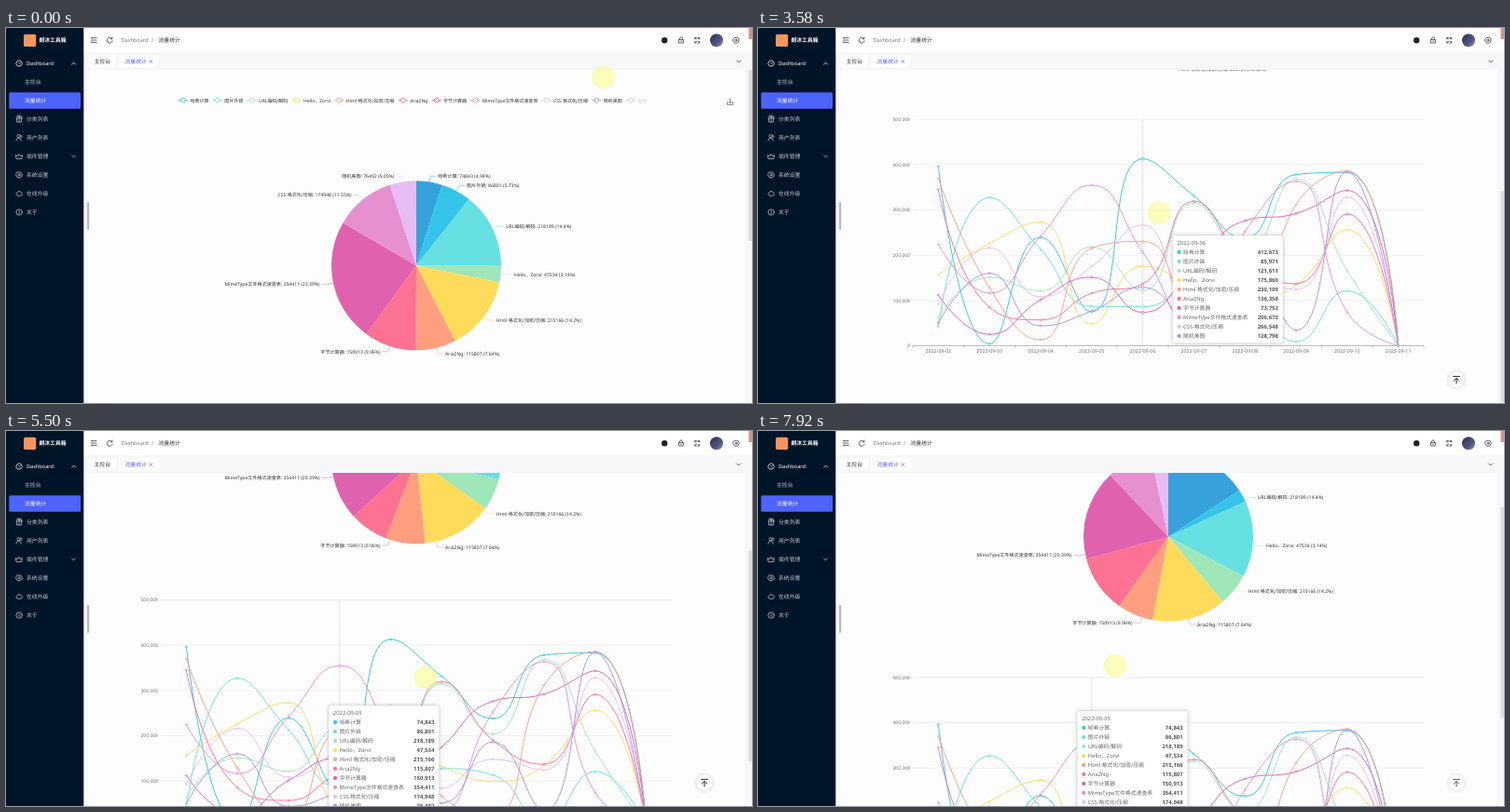
These frames come from a looping animation (800 px wide and 403 px high, 8 s). An HTML page:

```html
<!DOCTYPE html>
<html lang="zh-CN">
<head>
<meta charset="utf-8">
<title>流量统计</title>
<style>
html, body { margin: 0; width: 100%; height: 100%; overflow: hidden; background: #f5f7f9; }
svg { display: block; width: 100vw; height: 100vh; }
text { font-family: "Noto Sans", "Noto Sans CJK SC", sans-serif; text-rendering: geometricPrecision; white-space: pre; }
.icon { fill: none; stroke-width: .75; stroke-linecap: round; stroke-linejoin: round; }
.box { filter: drop-shadow(.4px .8px 2px rgba(0, 0, 0, .22)); }
</style>
</head>
<body>
<svg id="stage" viewBox="0 0 800 403">
  <defs>
    <clipPath id="view"><rect x="84" y="45" width="716" height="358"/></clipPath>
    <linearGradient id="face" x1="0" y1="0" x2="1" y2="1">
      <stop offset="0" stop-color="#2b2f4a"/><stop offset=".6" stop-color="#4d5480"/><stop offset="1" stop-color="#8c90b4"/>
    </linearGradient>
  </defs>
  <rect width="800" height="403" fill="#f5f7f9"/>
  <rect x="87.5" y="45" width="705" height="358" fill="#fefdfe"/>
  <g clip-path="url(#view)">
    <g id="page">
      <g id="legend"></g>
      <path class="icon" stroke="#666" d="M773.5 79.5v3h6v-3M776.5 76v4.6M774.8 79l1.7 1.7 1.7-1.7"/>
      <g id="pie"></g>
      <g id="chart"></g>
      <g id="tip"></g>
    </g>
    <rect id="thumb" x="796.3" width="3.7" height="227" fill="#dddddf"/>
  </g>
  <g id="top">
    <circle class="box" cx="749" cy="378" r="8.4" fill="#fff"/>
    <path class="icon" style="stroke-width:1" stroke="#222" d="M745.6 374.4h6.8M749 382v-5.4M746.2 379.2l2.8-2.8 2.8 2.8"/>
  </g>
  <g id="frame">
    <rect x="83" width="717" height="27" fill="#fff"/>
    <rect x="83" y="26.7" width="717" height=".4" fill="#e8eaee"/>
    <rect x="83" y="27.1" width="717" height="17.9" fill="#f5f7f9"/>
    <rect x="88" y="29.3" width="30" height="13.2" rx="1" fill="#fff"/>
    <rect x="121" y="29.3" width="43" height="13.2" rx="1" fill="#fff"/>
    <rect x="796.5" width="3.5" height="12" fill="#cf9688"/>
    <rect x="87" y="187" width="2.2" height="30" rx="1" fill="#b9b9bc"/>
    <rect width="83.3" height="403" fill="#001428"/>
    <rect x="3.3" y="69.2" width="76.7" height="17.5" rx="1.3" fill="#4d63fa"/>
    <rect x="19" y="6.8" width="13.2" height="13.2" rx="1.5" fill="#f4955f"/>
    <g class="icon" stroke="#333">
      <path d="M91.2 10.6h5.8M93.6 13h3.4M91.2 15.4h5.8M92.6 12l-1.2 1 1.2 1"/>
      <path d="M113.6 11.4a3 3 0 1 0 .6 2.6M113.9 10v1.8h-1.8"/>
      <path d="M721.6 12.6h4.8v3.4h-4.8zM722.5 12.6v-1.2a1.5 1.5 0 0 1 3 0v1.2M724 14v.8"/>
      <path d="M738.8 12v-1.6h1.6M743.6 12v-1.6h-1.6M738.8 14.4v1.6h1.6M743.6 14.4v1.6h-1.6M739 10.6l1.4 1.4M743.4 10.6l-1.4 1.4M739 15.8l1.4-1.4M743.4 15.8l-1.4-1.4"/>
      <path d="M781.3 10.3h3.4l1.7 2.9-1.7 2.9h-3.4l-1.7-2.9z"/><circle cx="783" cy="13.2" r="1.1"/>
      <path d="M783.6 35l2 2 2-2"/>
    </g>
    <path class="icon" stroke="#5565f5" d="M154 34.6l2.8 2.8M156.8 34.6l-2.8 2.8"/>
    <circle cx="706.2" cy="13.2" r="3.2" fill="#222"/>
    <circle cx="762" cy="13.2" r="7" fill="url(#face)"/>
    <g class="icon" stroke="#c3c8ce">
      <path stroke="#fff" d="M12 40.6a3.2 3.2 0 1 1 4.2 0zM14 38.6l1.4-1.6M70.6 39l1.9-1.9 1.9 1.9"/>
      <path d="M11 97h6.2M11.6 97v4h5v-4M11.2 95.2h5.8v1.8M14.1 95.2v5.8M14 95l-1.5-1.5M14.2 95l1.5-1.5"/>
      <circle cx="13.6" cy="116.2" r="1.7"/><path d="M11 121c.2-4 5-4 5.2 0M16 115l1.2 1.6-1.2 1.4"/>
      <path d="M11.4 140.6h5.4l.7-4-2 1.2-1.4-2.4-1.4 2.4-2-1.2zM70.6 137l1.9 1.9 1.9-1.9"/>
      <path d="M12.4 155h3.4l1.7 2.9-1.7 2.9h-3.4l-1.7-2.9z"/><circle cx="14.1" cy="157.9" r="1.1"/>
      <path d="M12.4 180.2a1.7 1.7 0 0 1-.2-3.3a2.2 2.2 0 0 1 4.1 0a1.7 1.7 0 0 1-.2 3.3z"/>
      <circle cx="14.1" cy="198" r="3.2"/><path d="M14.1 197.6v2M14.1 196.2v.1"/>
    </g>
  </g>
  <circle id="cursor" r="12.5" fill="#fafa50" fill-opacity=".38"/>
</svg>
<script>
const $ = id => document.getElementById(id);
const NS = 'http://www.w3.org/2000/svg';

function set(el, attrs) {
  for (const k in attrs) el.setAttribute(k, attrs[k]);
}
function add(parent, tag, attrs = {}) {
  const el = document.createElementNS(NS, tag);
  set(el, attrs);
  return parent.appendChild(el);
}
// y is the middle of the line of text
function label(parent, x, y, str, size, fill, more = {}) {
  const el = add(parent, 'text', { x, y: y + size * .36, 'font-size': size, fill, ...more });
  el.textContent = str;
  return el;
}
const clamp = (v, a, b) => Math.max(Math.min(a, b), Math.min(Math.max(a, b), v));
const lerp = (a, b, u) => a.map((v, i) => v + (b[i] - v) * u);

// daily visits in thousands; the last day is empty
const VISITS = {
  '哈希计算': [396, 4, 239, 74.843, 412.673, 331, 238, 378.058, 383, 0],
  '图片外链': [42, 327, 213, 86.801, 85.971, 127, 113, 8.956, 121, 0],
  'URL编码/解码': [63, 151, 121, 218.189, 121.611, 315, 203, 368.142, 166, 0],
  'Hello，Zorvi': [156, 226, 273, 47.534, 175.86, 132, 99, 134.613, 256, 0],
  'Html 格式化/加密/压缩': [370, 128, 13, 215.166, 230.109, 66, 28, 311.296, 386, 0],
  'Aria2Ng': [345, 85, 57, 115.807, 136.358, 319, 190, 136.785, 291, 0],
  '字节计算器': [112, 25, 101, 150.913, 73.753, 175, 276, 291.889, 343, 0],
  'MimeType文件格式速查表': [224, 116, 242, 354.411, 206.67, 36, 252, 363.29, 74, 0],
  'CSS 格式化/压缩': [92, 216, 108, 174.948, 266.548, 84, 148, 124.267, 328, 0],
  '随机美图': [50, 160, 44, 76.492, 128.798, 51, 186, 34.29, 384, 0]
};
const NAMES = Object.keys(VISITS);
const ROWS = Object.values(VISITS);
const PALETTE = ['#37a2da', '#32c5e9', '#67e0e3', '#9fe6b8', '#ffdb5c', '#ff9f7f',
  '#fb7293', '#e062ae', '#e690d1', '#e7bcf3', '#9d96f5'];
const FIRST_DAY = 3;
const date = day => '2022-09-' + String(day + 2).padStart(2, '0');
const count = (row, day) => Math.round(row[day] * 1000);

// each series' part of a day; a fraction lies between two days
function shares(day) {
  const d = Math.floor(day), u = day - d;
  if (u) return lerp(shares(d), shares(d + 1), u);
  const sum = ROWS.reduce((s, row) => s + row[d], 0);
  return ROWS.map(row => row[d] / sum);
}

// ---- motion: [time, value...] ----
const SCROLL = [[2417, 0], [2667, 117.5], [3300, 308.3], [4167, 308.3], [4250, 286.5],
  [5400, 225], [5800, 225], [6333, 141.6]];
const MOUSE = [[250, 641, 53], [900, 395, 185], [1083, 385, 210], [1333, 401, 250], [1550, 455, 310],
  [1717, 490, 230], [1930, 436, 216], [3300, 436, 216], [4000, 421.5, 174], [4250, 421, 271],
  [5250, 336.5, 278], [5500, 450, 265], [6167, 575.5, 292], [6500, 580, 293],
  [7150, 334, 292], [7667, 333, 292], [7917, 383, 252]];
const PIE_DAY = [[3100, 3], [4437, 4], [4900, 4], [5500, 3.44], [6300, 3.47], [9000, 7]];

function segment(keys, t) {
  const n = keys.findIndex(k => k[0] > t), last = keys[keys.length - 1];
  if (n === 0) return [keys[0], keys[0], 0];
  if (n < 0) return [last, last, 0];
  const a = keys[n - 1], b = keys[n];
  return [a, b, (t - a[0]) / (b[0] - a[0])];
}
function at(keys, t) {
  const [a, b, u] = segment(keys, t);
  return lerp(a.slice(1), b.slice(1), u);
}

// the page answers the mouse a little late
const LAG = 250, FADE = 150, SAMPLES = 8;
function felt(t) {
  const [x, y] = at(MOUSE, t - LAG);
  return [x, y + at(SCROLL, t - LAG)[0]];
}
// mean over the fade time, so that jumps become linear fades
function soften(t, value) {
  let sum = 0;
  for (let i = 0; i < SAMPLES; i++) sum += value(felt(t - FADE * i / (SAMPLES - 1)));
  return sum / SAMPLES;
}

// ---- shell ----
const frame = $('frame');
label(frame, 35.5, 13.2, '朗沐工具箱', 5.8, '#fff', { 'font-weight': 700 });
['Dashboard', '主控台', '流量统计', '分类列表', '用户列表', '插件管理', '系统设置', '在线升级', '关于'].forEach((s, i) => {
  const lit = i === 0 || i === 2, nested = i === 1 || i === 2;
  label(frame, nested ? 20 : 22, 38 + i * 20, s, i ? 5.83 : 5.6, lit ? '#fff' : '#c3c8ce', { 'font-weight': lit ? 500 : 400 });
});
label(frame, 123.5, 13.2, 'Dashboard', 5.6, '#767c82');
label(frame, 156.3, 13.2, '/', 5.6, '#767c82');
label(frame, 163.5, 13.2, '流量统计', 5.83, '#333639');
label(frame, 94.5, 36, '主控台', 5.83, '#333639');
label(frame, 127.5, 36, '流量统计', 5.83, '#5565f5');

// ---- legend ----
let legendX = 185;
[...NAMES, '其他'].forEach((s, i) => {
  const on = i < NAMES.length, stroke = on ? PALETTE[i + 1] : '#ccc', g = $('legend'), y = 77.7;
  add(g, 'path', { d: `M${legendX} ${y}h10.4`, stroke, 'stroke-width': .9 });
  add(g, 'circle', { cx: legendX + 5.2, cy: y, r: 2.4, fill: '#fff', stroke, 'stroke-width': .9 });
  const text = label(g, legendX + 12.5, y, s, 5.03, on ? '#333' : '#ccc');
  legendX += 16.7 + text.getComputedTextLength();
});

// ---- pie ----
const CX = 440, CY = 255.3, R = 91, ARM = 6.25;
const polar = (f, r) => [CX + r * Math.sin(f * 2 * Math.PI), CY - r * Math.cos(f * 2 * Math.PI)];
const slices = NAMES.map((_, i) => add($('pie'), 'path', { fill: PALETTE[i] }));
const tags = NAMES.map((_, i) => {
  const g = add($('pie'), 'g');
  return { g, line: add(g, 'path', { fill: 'none', stroke: PALETTE[i], 'stroke-width': .5 }),
    text: label(g, 0, 0, '', 5.08, '#333') };
});

// index of the slice under a point, or -1
function sliceAt([x, y]) {
  if (Math.hypot(x - CX, y - CY) > R) return -1;
  let f = (Math.atan2(x - CX, CY - y) / (2 * Math.PI) + 1) % 1;
  return shares(FIRST_DAY).findIndex(s => (f -= s) < 0);
}

function drawPie(t, day) {
  const [a, b, u] = segment(PIE_DAY, t);
  const now = lerp(shares(a[1]), shares(b[1]), u), goal = shares(day);
  let from = 0, sum = 0;
  NAMES.forEach((name, i) => {
    const to = from + now[i], r = R + 2 * soften(t, p => +(sliceAt(p) === i));
    const opacity = soften(t, p => [-1, i].includes(sliceAt(p)) ? 1 : .11);
    set(slices[i], { d: `M${CX} ${CY}L${polar(from, r)}A${r} ${r} 0 0 1 ${polar(to, r)}Z`, opacity });
    from = to;

    // labels jump to the new day at once
    const mid = sum + goal[i] / 2, side = mid < .5 ? 1 : -1, tag = tags[i];
    const elbow = polar(mid, R + ARM), end = elbow[0] + side * ARM;
    sum += goal[i];
    set(tag.g, { opacity });
    set(tag.line, { d: `M${polar(mid, R)}L${elbow}H${end}` });
    set(tag.text, { x: end + side * 2, y: elbow[1] + 1.8, 'text-anchor': side > 0 ? 'start' : 'end' });
    tag.text.textContent = `${name}: ${count(ROWS[i], day)} (${+(goal[i] * 100).toFixed(2)}%)`;
  });
}

// ---- line chart ----
const LEFT = 166, RIGHT = 714, BASE = 649.7, STEP = (RIGHT - LEFT) / 10;
const px = day => LEFT + STEP * (day + .5);
const py = v => BASE - v * .4865;

// cubic curve whose handles stay within the box of each segment
function curve(pts) {
  let d = 'M' + pts[0], out = pts[0];
  for (let i = 1; i < pts.length; i++) {
    const [a, p, n] = [pts[i - 1], pts[i], pts[i + 1]];
    let inn = p, next = p;
    if (n) {
      const before = Math.hypot(p[0] - a[0], p[1] - a[1]), after = Math.hypot(n[0] - p[0], n[1] - p[1]);
      const ratio = after / (before + after);
      next = p.map((v, k) => clamp(v + (n[k] - a[k]) * .5 * ratio, v, n[k]));
      inn = p.map((v, k) => clamp(v - (next[k] - v) * before / after, a[k], v));
      next = p.map((v, k) => v + (v - inn[k]) * after / before);
    }
    d += `C${out} ${inn} ${p}`;
    out = next;
  }
  return d;
}

const chart = $('chart');
for (let v = 0; v <= 500; v += 100) {
  add(chart, 'path', { d: `M${LEFT} ${py(v)}H${RIGHT}`, stroke: v ? '#e0e3ea' : '#6e7079', 'stroke-width': .5 });
  label(chart, 163, py(v), v ? v + ',000' : '0', 5, '#6e7079', { 'text-anchor': 'end' });
}
for (let i = 0; i <= 10; i++) {
  add(chart, 'path', { d: `M${LEFT + i * STEP} ${BASE}v2.1`, stroke: '#6e7079', 'stroke-width': .5 });
  if (i < 10) label(chart, px(i), BASE + 5.6, date(i), 5.3, '#6e7079', { 'text-anchor': 'middle' });
}
const pointer = add(chart, 'path', { stroke: '#b3b8c6', 'stroke-width': .5, 'stroke-dasharray': '1.8 .8' });
const dots = ROWS.map((row, i) => {
  const pts = row.map((v, k) => [px(k), py(v)]), stroke = PALETTE[i + 1];
  add(chart, 'path', { d: curve(pts), fill: 'none', stroke, 'stroke-width': .95 });
  return pts.map(([cx, cy]) => add(chart, 'circle', { cx, cy, fill: '#fff', stroke, 'stroke-width': .9 }));
});
const inChart = ([, y]) => y > py(500) && y < BASE;

// ---- tooltip ----
const tip = $('tip');
add(tip, 'rect', { class: 'box', width: 118.4, height: 115.6, rx: 1.7, fill: '#fff', stroke: '#d5d8de', 'stroke-width': .4 });
const tipDate = label(tip, 4.8, 8, '', 5.9, '#666');
const tipValues = NAMES.map((s, i) => {
  const y = 18 + i * 10;
  add(tip, 'circle', { cx: 7, cy: y, r: 2.1, fill: PALETTE[i + 1] });
  label(tip, 11.5, y, s, 5.83, '#666');
  return label(tip, 113.4, y, '', 6, '#555', { 'text-anchor': 'end', 'font-weight': 700 });
});

function drawHover(t, day) {
  const [x, y] = felt(t), opacity = soften(t, p => +inChart(p));
  set(tip, { transform: `translate(${x + 9.3} ${y + 9})`, opacity });
  tipDate.textContent = date(day);
  tipValues.forEach((el, i) => el.textContent = count(ROWS[i], day).toLocaleString('en-US'));
  set(pointer, { d: `M${px(day)} ${py(500)}V${BASE}`, opacity });
  dots.forEach(row => row.forEach((el, k) => set(el, { r: opacity && k === day ? 1.25 : .9 })));
}

function draw(ms) {
  // the screen is refreshed twelve times a second
  const tick = 1000 / 12, t = Math.floor((ms % 8000 + 5) / tick) % 96 * tick + .5;
  const scroll = at(SCROLL, t)[0], [cx, cy] = at(MOUSE, t), spot = felt(t);
  const day = inChart(spot) ? Math.floor((spot[0] - LEFT) / STEP) : FIRST_DAY;
  set($('page'), { transform: `translate(0 ${-scroll})` });
  set($('thumb'), { y: 2 + scroll * .562 });
  set($('top'), { opacity: clamp((scroll - 90) / 70, 0, 1) });
  set($('cursor'), { cx, cy });
  drawPie(t, day);
  drawHover(t, day);
}

const start = performance.now();
function loop() {
  draw(performance.now() - start);
  requestAnimationFrame(loop);
}
loop();
</script>
</body>
</html>
```
